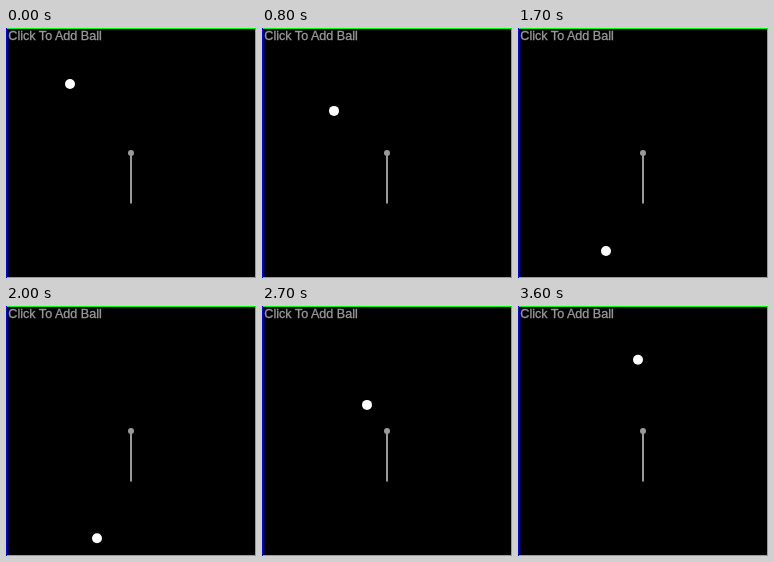
These frames come from a looping animation (250x250 px, 3700 ms). An HTML page:

```html
<!DOCTYPE html>
<html lang="en">
<head>
<meta charset="utf-8">
<title>Bouncing ball</title>
<style>
  html, body { margin: 0; width: 100%; height: 100%; overflow: hidden; background: #000; }
  svg { display: block; width: 100%; height: 100%; }
  text { font: 12.6px "Liberation Sans", Arial, sans-serif; font-kerning: normal; }
</style>
</head>
<body>
<svg viewBox="0 0 250 250">
  <rect width="250" height="250" fill="#000"/>
  <text x="2.3" y="12.4" fill="#999" stroke="#999" stroke-width="0.3">Click To Add Ball</text>
  <path d="M125 125V175.5" stroke="#999" stroke-width="2"/>
  <circle cx="125" cy="125" r="3" fill="#999"/>
  <circle id="ball" r="5" fill="#fff"/>
  <path d="M249.5 0V250M0 249.5H250" stroke="#999"/>
  <rect width="250" height="1" fill="#0f0"/>
  <rect width="1" height="250" fill="#00f"/>
</svg>
<script>
  const ball = document.getElementById("ball");
  const FRAMES = 37, FRAME_MS = 100, GRAVITY = 0.45, BOUNCE = 26;
  // Displayed frames at which the simulation skips ahead, and by how many steps.
  const skips = [[11, 7], [22, 7], [33, 6]];

  const fall = (y, speed, t) => y + speed * t + GRAVITY * t * t / 2;

  function height(step) {
    if (step < BOUNCE) return fall(56, 1.56, step);
    return Math.min(244, fall(128, -8.18, step - 37));
  }

  function draw(ms) {
    const frame = Math.floor(ms / FRAME_MS) % FRAMES;
    const step = skips.reduce((n, [at, by]) => frame >= at ? n + by : n, frame);
    ball.setAttribute("cx", 64 + step);
    ball.setAttribute("cy", height(step));
  }

  const start = performance.now();
  function tick() {
    draw(performance.now() - start);
    requestAnimationFrame(tick);
  }
  tick();
</script>
</body>
</html>
```
